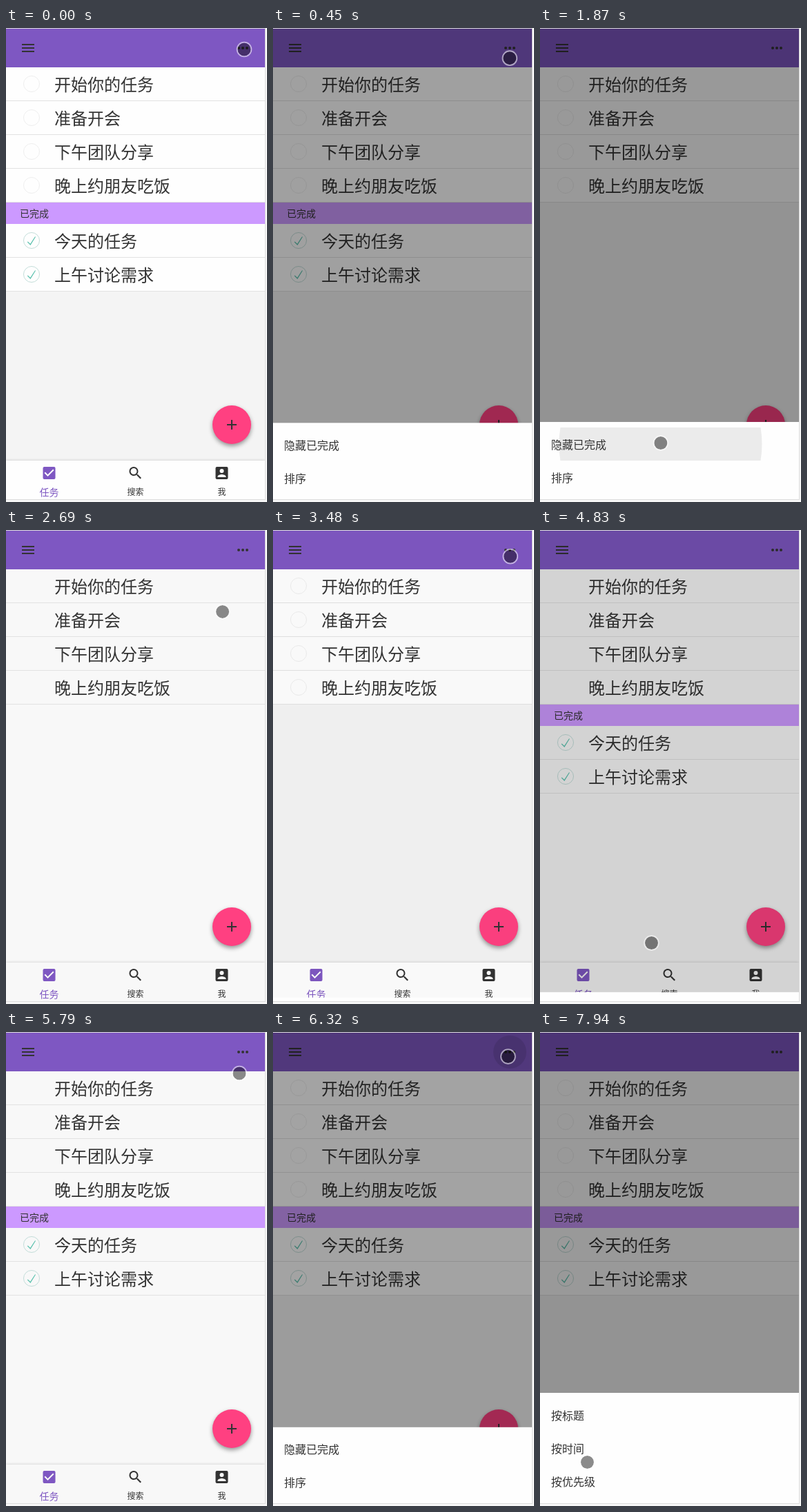
Recreate the animation shown at these times as an HTML page with a canvas. Size 378x687 px, loop 8000 ms.

```html
<!DOCTYPE html>
<html lang="zh-CN">
<head>
<meta charset="utf-8">
<title>任务</title>
<style>
html, body { margin: 0; width: 100%; height: 100%; overflow: hidden; background: #f8f8f8; }
canvas { display: block; width: 378px; height: 687px; }
</style>
</head>
<body>
<canvas id="stage" width="378" height="687"></canvas>
<script>
const ctx = document.getElementById('stage').getContext('2d');
const LOOP = 8000, W = 375, TOP = 1, BOTTOM = 683;
const FONT = '"Noto Sans CJK SC", "Noto Sans CJK", sans-serif';
const INK = '#333', PURPLE = '#7e57c2', PAPER = '#fefefe', FLAT = '#f8f8f8';
const SLIDE = 400, HIDE_AT = 1870, SHOW_AT = 4675;

const todo = ['开始你的任务', '准备开会', '下午团队分享', '晚上约朋友吃饭'];
const done = ['今天的任务', '上午讨论需求'];

const sheets = [
  { open: 140, close: 1900, items: ['隐藏已完成', '排序'] },
  { open: 3470, close: 4675, items: ['显式已完成', '排序'] },
  { open: 6035, close: 7470, items: ['隐藏已完成', '排序'] },
  { open: 7500, close: Infinity, items: ['按标题', '按时间', '按优先级'] }
];
const shades = [[140, 1900], [3470, 4675], [6035, Infinity]];

// Screen updates: first, last, count. The picture holds in between.
const bursts = [
  [0, 0, 1], [150, 1140, 8], [1290, 1570, 3], [1870, 2840, 8], [2960, 3200, 3],
  [3480, 4440, 8], [4560, 4560, 1], [4830, 5790, 8], [5930, 6950, 9],
  [7100, 7100, 1], [7400, 7940, 5]
];

// Pointer path: time, x, y
const path = [
  [0, 345, 31], [430, 343, 43], [570, 335, 75], [860, 240, 390], [1000, 192, 550],
  [1140, 178, 605], [1570, 174.5, 602.5], [2008, 175, 601], [2147, 182, 580],
  [2286, 217, 486], [2424, 264, 335], [2563, 289, 184], [2701, 313.5, 118.5],
  [2840, 341, 79], [3200, 344, 33], [3754, 343.5, 43.5], [3891, 332, 80],
  [4166, 235, 390], [4303, 188, 550], [4440, 166, 597], [4830, 161.5, 598.5],
  [5104, 166, 588], [5241, 212, 480], [5515, 288, 190], [5650, 315, 115],
  [5790, 338, 60], [5930, 341, 40], [6312, 340.5, 35.5], [6440, 332, 65],
  [6695, 170, 440], [6822, 95, 590], [6950, 71, 645], [7400, 70.5, 646],
  [7540, 70, 643], [7940, 68.5, 623.5]
];

const clamp = v => Math.max(0, Math.min(1, v));
const easeOut = x => 1 - (1 - x) ** 2;

// cubic-bezier(.36, .66, .04, 1)
function slideEase(x) {
  let lo = 0, hi = 1;
  for (let i = 0; i < 20; i++) {
    const s = (lo + hi) / 2, r = 1 - s;
    if (3 * r * r * s * .36 + 3 * r * s * s * .04 + s ** 3 < x) lo = s; else hi = s;
  }
  const r = 1 - lo;
  return 3 * r * r * lo * .66 + 3 * r * lo * lo + lo ** 3;
}

function presence(t, open, close, ease) {
  return ease(clamp((t - open) / SLIDE)) - ease(clamp((t - close) / SLIDE));
}

function hold(t) {
  const [first, last, count] = bursts.filter(b => b[0] <= t).pop();
  if (count === 1) return first;
  const step = (last - first) / (count - 1);
  return first + step * Math.min(count - 1, Math.floor((t - first) / step + .1));
}

function pointerAt(t) {
  const i = path.findIndex(p => p[0] > t);
  if (i < 0) return path[path.length - 1].slice(1);
  const a = path[i - 1], b = path[i], k = (t - a[0]) / (b[0] - a[0]);
  return [a[1] + (b[1] - a[1]) * k, a[2] + (b[2] - a[2]) * k];
}

function rect(x, y, w, h, color) {
  ctx.fillStyle = color;
  ctx.fillRect(x, y, w, h);
}

function disc(x, y, r, color) {
  ctx.fillStyle = color;
  ctx.beginPath();
  ctx.arc(x, y, r, 0, 2 * Math.PI);
  ctx.fill();
}

function ring(x, y, r, width, color) {
  ctx.strokeStyle = color;
  ctx.lineWidth = width;
  ctx.beginPath();
  ctx.arc(x, y, r, 0, 2 * Math.PI);
  ctx.stroke();
}

function text(str, x, midY, size, color = INK, align = 'left', weight = 400) {
  ctx.font = `${weight} ${size}px ${FONT}`;
  ctx.textAlign = align;
  ctx.fillStyle = color;
  ctx.fillText(str, x, midY + size * .38);
}

function shadow(color, blur, y) {
  ctx.shadowColor = color;
  ctx.shadowBlur = blur;
  ctx.shadowOffsetY = y;
}

function icon(d, x, y, color) {
  ctx.save();
  ctx.translate(x - 12, y - 12);
  ctx.fillStyle = color;
  ctx.fill(new Path2D(d), 'evenodd');
  ctx.restore();
}

function tick(x, y) {
  ctx.save();
  ctx.translate(x, y);
  ctx.scale(.23, .23);
  ctx.fillStyle = '#5dc2af';
  ctx.fill(new Path2D('M22-25L-8 21-23 6-27 10-7 30 26-23z'));
  ctx.restore();
}

function row(label, y, bg, checked, circle) {
  rect(0, y, W, 48, bg);
  rect(0, y + 48, W, 1, '#e2e2e2');
  if (circle) ring(37, y + 24, 11.5, .9, checked ? '#bddad5' : '#ededed');
  if (checked) tick(37, y + 24);
  text(label, 70, y + 24.5, 24, INK, 'left', 300);
}

function header(t) {
  rect(0, TOP, W, 56, PURPLE);
  for (const y of [23, 28, 33]) rect(23, y, 18, 2, INK);
  if (t > 5950 && t < 6450) disc(343, 29, 24, 'rgba(0,0,0,.1)');
  for (const x of [337, 343, 349]) disc(x, 29, 2, INK);
}

function list(t, flat) {
  const bg = flat ? FLAT : PAPER;
  todo.forEach((s, i) => row(s, 57 + 49 * i, bg, false, !flat));
  if (t >= HIDE_AT && t < SHOW_AT) return;
  rect(0, 253, W, 31, '#cc99ff');
  text('已完成', 20, 268.5, 14);
  done.forEach((s, i) => row(s, 284 + 49 * i, bg, true, true));
}

function addButton() {
  ctx.save();
  shadow('rgba(0,0,0,.4)', 6, 3);
  disc(327, 575, 28, '#ff4081');
  ctx.restore();
  rect(320, 574, 14, 2, INK);
  rect(326, 568, 2, 14, INK);
}

function tabs(flat) {
  ctx.save();
  shadow('rgba(0,0,0,.2)', 4, 0);
  rect(0, 627, W, 56, flat ? FLAT : PAPER);
  ctx.restore();
  icon('M19 3H5a2 2 0 0 0-2 2v14a2 2 0 0 0 2 2h14a2 2 0 0 0 2-2V5a2 2 0 0 0-2-2zM10 17l-5-5 1.4-1.4 3.6 3.6 7.6-7.6L19 8z', 62.5, 645, PURPLE);
  icon('M15.5 14h-.8l-.3-.3A6.5 6.5 0 1 0 13.700 14.400l.3.3v.8l5 5 1.500-1.500zM9.500 14a4.500 4.500 0 1 1 0-9 4.500 4.500 0 0 1 0 9z', 187.5, 645, INK);
  icon('M5 3h14a2 2 0 0 1 2 2v14a2 2 0 0 1-2 2H5a2 2 0 0 1-2-2V5a2 2 0 0 1 2-2zM15 9a3 3 0 1 0-6 0 3 3 0 0 0 6 0zM6 17v1h12v-1c0-2-4-3.100-6-3.100S6 15 6 17z', 312.5, 645, INK);
  text('任务', 62.5, 673, 14, PURPLE, 'center');
  text('搜索', 187.5, 672, 12, INK, 'center');
  text('我', 312.5, 672, 12, INK, 'center');
}

function ripple(t, start, x, y, top, r0) {
  const age = t - start;
  if (age < 0 || age > 300) return;
  ctx.save();
  ctx.beginPath();
  ctx.rect(0, top, W, 48);
  ctx.clip();
  disc(x, y, r0 + age * .9, `rgba(0,0,0,${.075 * (1 - age / 300)})`);
  ctx.restore();
}

function drawSheet(t, { open, close, items }, index) {
  const shown = presence(t, open, close, slideEase);
  if (shown <= 0) return;
  const h = items.length * 48 + 16, y = BOTTOM - h * shown;
  rect(0, y, W, h, PAPER);
  if (index === 0) ripple(t, 1870, 174.5, y + 32, y + 8, 147);
  if (index === 2) ripple(t, 7400, 70, y + 76, y + 56, 100);
  items.forEach((s, i) => text(s, 16, y + 32.5 + 48 * i, 16));
}

function draw(t) {
  const flat = (t > 1900 && t < 3470) || (t > 4675 && t < 6035);
  rect(0, 0, 378, 687, FLAT);
  ctx.save();
  ctx.beginPath();
  ctx.rect(0, TOP, W, BOTTOM - TOP);
  ctx.clip();
  rect(0, TOP, W, BOTTOM, flat ? FLAT : '#f4f4f4');
  list(t, flat);
  header(t);
  addButton();
  tabs(flat);
  const shade = Math.max(...shades.map(([a, b]) => presence(t, a, b, easeOut)));
  rect(0, TOP, W, BOTTOM, `rgba(0,0,0,${.4 * shade})`);
  sheets.forEach((s, i) => drawSheet(t, s, i));
  ctx.restore();
  rect(0, 0, 376, 1, '#dcdcdc');
  rect(375, 0, 1, 684, '#dcdcdc');
  rect(0, 683, 376, 1, '#dcdcdc');
  const [x, y] = pointerAt(t);
  disc(x, y, 9.5, 'rgba(0,0,0,.45)');
  ring(x, y, 10.4, 1.8, 'rgba(255,255,255,.55)');
}

function frame(now) {
  draw(hold(now % LOOP));
  requestAnimationFrame(frame);
}
requestAnimationFrame(frame);
</script>
</body>
</html>
```
